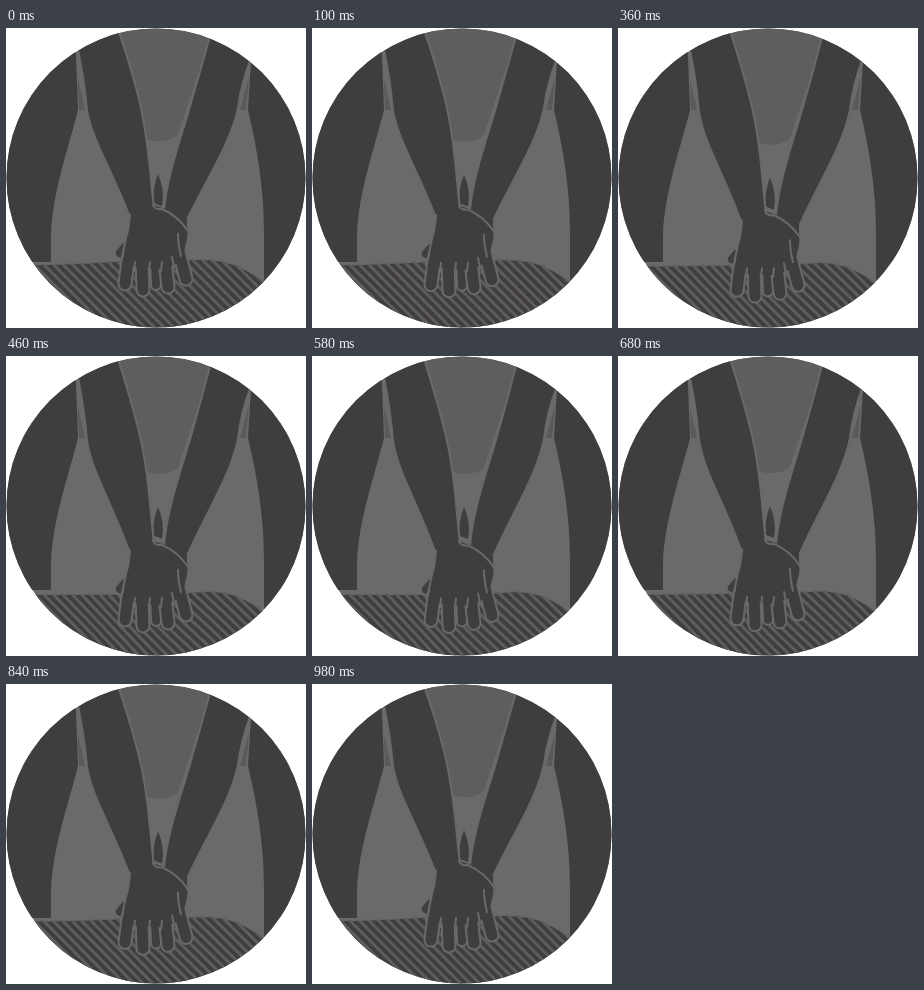
These frames come from a looping animation (300x300 px, 1 s). An HTML page:

```html
<!DOCTYPE html>
<html lang="en">
<head>
<meta charset="utf-8">
<title>Chest compressions</title>
<style>
html, body { margin: 0; width: 100%; height: 100%; overflow: hidden; background: #fff; }
svg { display: block; width: 100vw; height: 100vh; }
.dark { fill: #403d3e; }
.edge { stroke: #6a6969; stroke-width: 2; stroke-linejoin: round; stroke-linecap: round; }
.line { fill: none; }
.shade { fill: #5b595a; }
</style>
</head>
<body>
<svg viewBox="0 0 300 300">
  <defs>
    <clipPath id="disc"><circle cx="150" cy="150" r="149.5"/></clipPath>
    <clipPath id="chestClip"><path id="chestMask"/></clipPath>
  </defs>
  <g clip-path="url(#disc)">
    <rect width="300" height="300" fill="#6a6a6a"/>
    <path class="dark" d="M0 0H69L72 82C64 115 46 165 45 207V234H0Z"/>
    <path class="dark" d="M300 0H247L242 82C251 120 258 160 258 205V300H300Z"/>
    <g id="upper">
      <path d="M105 -12H212L172 108Q158 117 141 112Z" fill="#5f5e5e" stroke="#6c6b6b"/>
      <path class="dark" d="M152 146Q159 162 156 178L148 175Q146 161 152 146Z"/>
    </g>
    <path class="shade" d="M72 50L79 82H73Z"/>
    <path class="shade" d="M243 48L240 82H234Z"/>
    <path id="armR" class="dark edge"/>
    <path id="armL" class="dark edge"/>
    <path id="chest" class="dark edge"/>
    <path id="stripes" class="line" stroke="#5e5c5d" stroke-width="3" clip-path="url(#chestClip)"/>
    <g id="hands">
      <path class="dark edge" d="M122 210Q114 216 109 223Q107 230 117 231Z"/>
      <g id="fingers"></g>
      <path class="dark" d="M125 184L147 177L160 181Q173 187 182 201L181 211L176 232Q164 241 150 241L118 238Q117 218 121 207Q125 195 125 184Z"/>
      <path class="edge line" d="M123 186Q124 198 120 210L115 234M147 177Q149 182 156 181Q172 188 182 203Q184 208 182 212M172 206Q172 216 175 228M128 243L129 234M143 243L144 234M155 243L156 234M168 239L166 229"/>
    </g>
  </g>
</svg>
<script>
const el = id => document.getElementById(id);
const set = (id, d) => el(id).setAttribute('d', d);

// Each finger: knuckle x, knuckle y, tip x, tip y, width
const fingers = [
  [149, 232, 150, 257, 10],
  [122, 232, 119, 256, 13],
  [136, 234, 137, 262, 13],
  [159, 232, 162, 259, 13],
  [173, 224, 180, 251, 13]
];
el('fingers').innerHTML = fingers.map(([x, y, tx, ty, w]) => {
  const d = `M${x} ${y}L${tx} ${ty}`;
  return `<path d="${d}" stroke="#6a6969" stroke-width="${w + 2}" stroke-linecap="round"/>` +
    `<path d="${d}" stroke="#403d3e" stroke-width="${w - 2}" stroke-linecap="round"/>`;
}).join('');

function press(ms) {
  const t = Math.floor(ms % 1000 / 20) * 20;
  const phase = t < 550 ? t / 550 : (1000 - t) / 450;
  return (1 - Math.cos(Math.PI * phase)) / 2;
}

function draw(ms) {
  const p = press(ms), up = 5 * p, low = 8.5 * p;
  const sag = x => p * (2 + 5 * Math.exp(-(((x - 150) / 55) ** 2)));
  const at = (x, y) => `${x} ${(y + sag(x)).toFixed(2)}`;

  el('upper').setAttribute('transform', `translate(0 ${up})`);
  el('hands').setAttribute('transform', `translate(0 ${low})`);

  set('armL', `M64 -10L72 22Q78 50 81 ${82 + up / 2}C86 ${112 + up} 106 ${142 + up} 123 ${187 + low}` +
    `L148 ${180 + low}C144 ${150 + up} 143 ${110 + up} 132 ${67 + up}Q123 ${32 + up} 108 -10Z`);
  set('armR', `M209 -10Q196 ${37 + up} 187 ${68 + up}C179 ${99 + up} 161 ${145 + up} 158 ${182 + low}` +
    `L182 ${203 + low}V${190 + low}C201 ${150 + up} 225 ${114 + up} 232 ${80 + up / 2}Q235 56 245 30L252 -10Z`);

  const chest = `M20 ${236 + p * 2}L${at(45, 236)}Q${at(78, 235)} ${at(110, 233)}L${at(150, 231)}L${at(190, 231)}` +
    `Q${at(214, 230)} ${at(233, 238)}Q${at(248, 245)} ${at(258, 254)}L280 310H20Z`;
  set('chest', chest);
  set('chestMask', chest);

  let d = '';
  for (let x = -40; x < 270; x += 9.6) {
    d += `M${at(x, 226)}`;
    for (let s = 16; s <= 80; s += 16) d += `L${at(x + s, 226 + s)}`;
  }
  set('stripes', d);
}

const start = performance.now();
function tick(now) {
  draw(Math.max(0, now - start));
  requestAnimationFrame(tick);
}
draw(0);
requestAnimationFrame(tick);
</script>
</body>
</html>
```
